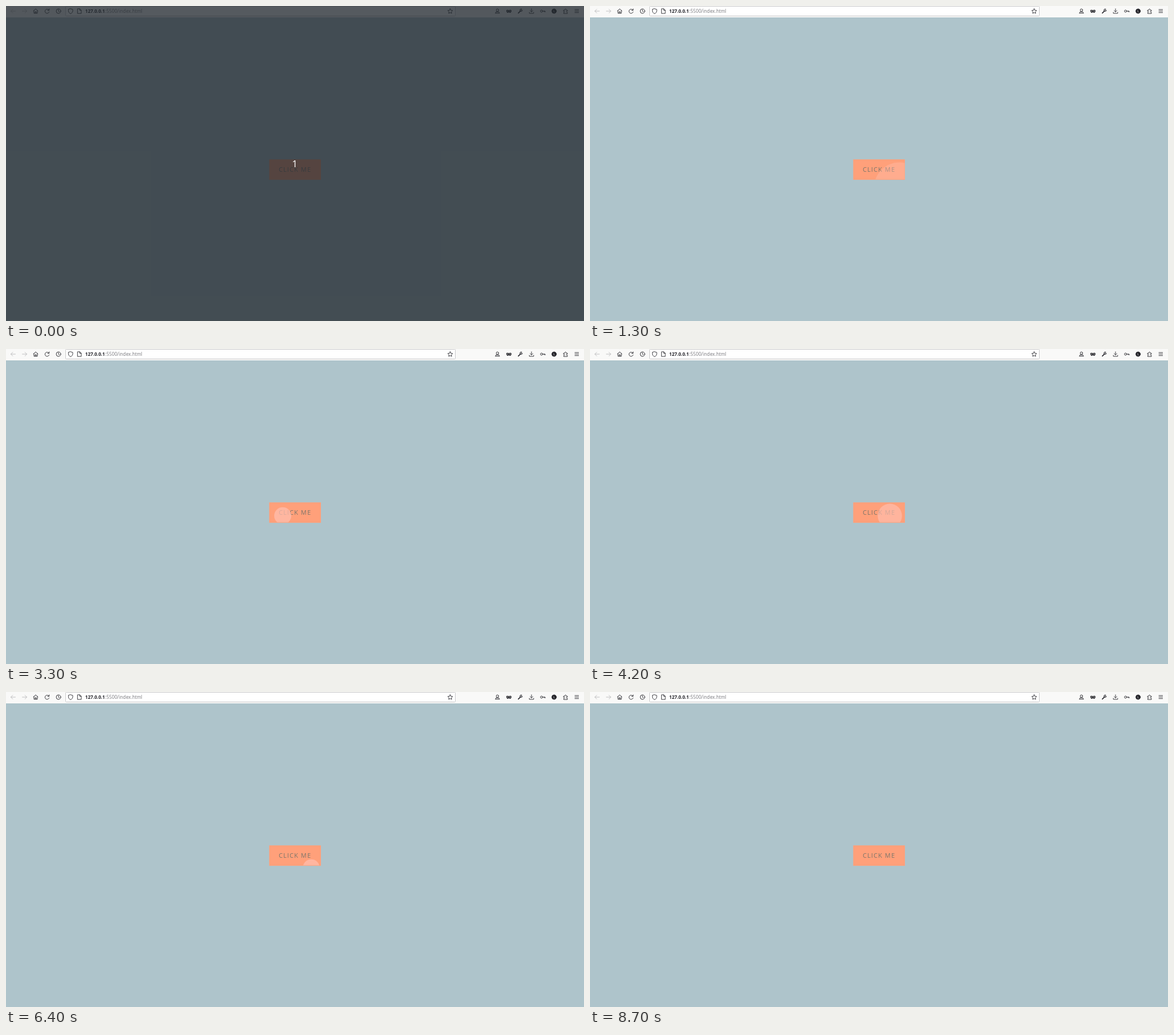
These frames come from a looping animation (1013x553 px, 9200 ms). An HTML page:

```html
<!DOCTYPE html>
<html lang="en">
<head>
<meta charset="utf-8">
<title>Ripple button</title>
<style>
  html, body { margin: 0; width: 100%; height: 100%; overflow: hidden; background: #aec4cb; }
  svg { display: block; width: 1013px; height: 553px; font-family: "Open Sans", "Noto Sans", sans-serif; }
  .icons { fill: none; stroke: #25252b; stroke-width: .9; stroke-linecap: round; stroke-linejoin: round; }
  .icons .off { stroke: #b9b9ba; }
  .icons .solid { fill: #25252b; }
  .url { font-size: 8.1px; fill: #75757a; }
  .host { font-weight: 700; fill: #25252b; }
  .label { font-size: 11px; letter-spacing: 1.1px; fill: #7c766b; }
  .count { font-size: 17px; fill: #fff; text-anchor: middle; }
  #intro { animation: intro 9200ms step-end infinite; }
  @keyframes intro {
    0% { visibility: visible; }
    1.08696%, 100% { visibility: hidden; }
  }
</style>
</head>
<body>
<svg viewBox="0 0 1013 553">
  <defs>
    <clipPath id="inside"><rect x="462" y="270" width="89.5" height="34.3"/></clipPath>
  </defs>

  <rect width="1013" height="553" fill="#aec4cb"/>
  <rect width="1013" height="20" fill="#f9f9f8"/>
  <rect x="104.5" y=".5" width="683" height="17" rx="1" fill="#fff" stroke="#c9c9ca"/>

  <g class="icons">
    <path class="off" d="M16.5 9H8.5M11.8 5.7 8.5 9l3.3 3.3"/>
    <path class="off" d="M28.5 9h8M33.2 5.7 36.5 9l-3.3 3.3"/>
    <path d="M48 8.7 52 5l4 3.7M49 8v4.8h6V8M51 12.6V10h2v2.6"/>
    <path d="M75 7A3.7 3.7 0 1 0 75.6 10.3M75.7 5v2.6H73"/>
    <circle cx="92" cy="9" r="4"/>
    <path d="M92 6.5V9l1.8 1.2"/>
    <path d="M113.2 4.8 117 6.1V8.4c0 2.4-1.6 4.2-3.8 5.1-2.2-.9-3.8-2.7-3.8-5.1V6.1z"/>
    <path d="M125.7 4.9h3.6l2.6 2.6v5.6h-6.2zM129.2 5v2.6h2.6"/>
    <path d="M778.5 4.8l1.3 2.7 3 .4-2.2 2.1.5 3-2.6-1.4-2.6 1.4.5-3-2.2-2.1 3-.4z"/>

    <circle cx="861.3" cy="7.2" r="2.1"/>
    <path d="M859.3 9.8 857.5 12.7h7.6l-1.8-2.9M859.6 10.5h3.4"/>
    <path class="solid" d="M877.6 7.4c1.4-.6 2.7-.1 3.8.4 1.1-.5 2.4-1 3.8-.4.5 2.4-.4 4.1-1.8 4.1-.9 0-1.3-.9-2-.9s-1.1.9-2 .9c-1.4 0-2.3-1.7-1.8-4.1z"/>
    <path d="M878.8 9h1.1M882.9 9h1.1" style="stroke:#f9f9f8;stroke-width:1.2"/>
    <path d="M898 12.3l3.8-3.8" style="stroke-width:1.7"/>
    <path d="M903.8 5.3a2.2 2.2 0 1 0 1.2 2.2l-1.7.3-.8-.9z"/>
    <path d="M921 4.8v5.4M918.6 8 921 10.4 923.4 8M917.2 11v1.9h7.6V11"/>
    <circle cx="938.6" cy="9" r="1.9"/>
    <path d="M940.6 9h4.4v1.5M943.2 9v1.2"/>
    <circle class="solid" cx="960.6" cy="9" r="4"/>
    <path d="M977.5 7.3h1.9c-.5-2.8 2.9-2.8 2.4 0h2.1v1.8c-2.4-.4-2.4 2.4 0 2v2.1h-6.4v-1.9c2 .3 2-2.3 0-2z"/>
    <path d="M997 6.2h6.6M997 8.9h6.6M997 11.6h6.6"/>
  </g>
  <text x="960.6" y="10.9" font-size="5.2" fill="#fff" text-anchor="middle">L</text>

  <text class="url host" x="138.8" y="12">127.0.0.1</text>
  <text class="url" x="173.8" y="12" letter-spacing=".08">:5500/index.html</text>

  <rect x="461.3" y="269.3" width="90.6" height="35.8" fill="#ffa07a"/>
  <text class="label" x="478" y="291.3">CLICK ME</text>
  <g clip-path="url(#inside)"><circle id="ripple" r="0" fill="#ffbeaf"/></g>

  <g id="intro">
    <rect width="1013" height="553" fill="#23292f" fill-opacity=".77"/>
    <text class="count" x="506" y="282.7">1</text>
  </g>
</svg>
<script>
  const LOOP = 9200, STEP = 100, LIFE = 300, RADIUS = 49, DROP = 0.65;
  // Each click: first visible time, age at that time, x, y
  const clicks = [
    [1200, 105, 542, 290],
    [2400, 74, 475.5, 288],
    [3300, 50, 485, 283],
    [4200, 74, 525.5, 279],
    [5400, 26, 546, 291],
    [6400, 50, 535, 299],
    [7200, 74, 498, 295.5],
    [8300, 50, 485, 285]
  ];
  const ripple = document.getElementById('ripple');
  const set = (name, value) => ripple.setAttribute(name, value);

  function draw() {
    const time = Math.floor(performance.now() % LOOP / STEP) * STEP;
    const click = clicks.find(([start, age]) => time >= start && time - start + age < LIFE);
    if (click) {
      const [start, age, x, y] = click;
      const p = (time - start + age) / LIFE;
      const r = RADIUS * (1 - (1 - p) ** 2);
      set('cx', x);
      set('cy', y + DROP * r);
      set('r', r);
      set('opacity', 0.85 - 0.7 * p);
    } else {
      set('r', 0);
    }
    requestAnimationFrame(draw);
  }
  draw();
</script>
</body>
</html>
```
